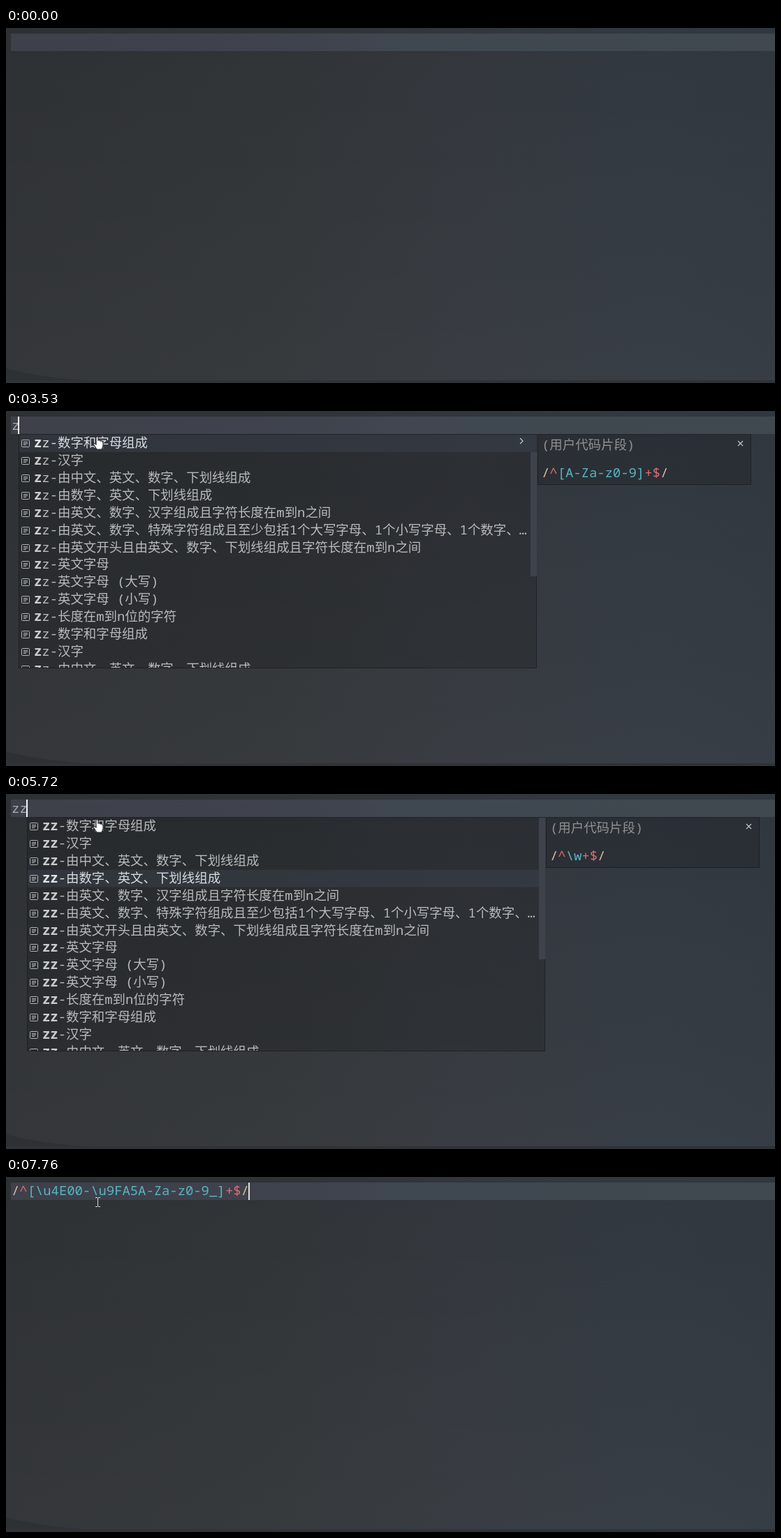
Animation, 1101 px wide and 509 px high, one loop 8000 ms. Source, as an HTML page with a canvas:

```html
<!DOCTYPE html>
<html lang="zh-CN">
<head>
<meta charset="utf-8">
<title>Snippet suggestions</title>
<style>
html, body { margin: 0; width: 100%; height: 100%; overflow: hidden; background: #32363a; }
canvas { display: block; }
</style>
</head>
<body>
<canvas id="stage" width="1101" height="509"></canvas>
<script>
const W = 1101, H = 509, LOOP = 8000, ROW = 24.92, CELL = 11.33;
const c = document.getElementById('stage').getContext('2d');

const MONO = '18.88px "Noto Sans Mono", "DejaVu Sans Mono", monospace';
const HAN = '18.43px "Noto Sans CJK SC", "Noto Sans CJK", sans-serif';
const SLASH = '#d9bd9f', RED = '#e06c75', CYAN = '#56b6c2', GOLD = '#d9b98a';

const labels = [
  '数字和字母组成', '汉字', '由中文、英文、数字、下划线组成', '由数字、英文、下划线组成',
  '由英文、数字、汉字组成且字符长度在m到n之间',
  '由英文、数字、特殊字符组成且至少包括1个大写字母、1个小写字母、1个数字、…',
  '由英文开头且由英文、数字、下划线组成且字符长度在m到n之间',
  '英文字母', '英文字母 (大写)', '英文字母 (小写)', '长度在m到n位的字符'
];
const regex = set => [['/', SLASH], ['^', RED], [set, CYAN], ['+$', RED], ['/', SLASH]];
const codes = [
  regex('[A-Za-z0-9]'),
  [['/', SLASH], ['^', RED], ['(?:', GOLD], ['[\\u3400-\\u4DB5\\u4E00-\\u9FEA]', CYAN]],
  regex('[\\u4E00-\\u9FA5A-Za-z0-9_]'),
  regex('\\w')
];
const thumbWidth = [0, 23, 261, 0];

// Timelines: [start in ms, value]
const selected = [[0, 0], [4740, 1], [5180, 2], [5720, 3], [6090, 2], [6620, 1], [7120, 2]];
const thumb = [[0, 0], [4980, .65], [5180, 0], [5500, 1], [5720, 0], [6410, 1], [7120, 0], [7360, 1]];
const caret = [[0, 0], [2560, 1], [4140, 0], [4630, 1], [5670, 0], [5720, 1],
  [6550, 0], [6620, 1], [7000, 0], [7120, 1]];
const at = (line, t) => line.findLast(k => k[0] <= t)[1];

// Pointer path: [ms, x, y, easing power into this point]
const path = [[260, 788, 467, 1], [1060, 176, 161, 1.5], [1160, 176, 161, 1], [1960, 116, 48, 1.5],
  [2030, 116, 48, 1], [2600, 122, 41, 1], [2770, 129, 38, 1], [2870, 130, 37, 1], [2890, 131, 36, 1]];

function pointerAt(t) {
  const i = path.findIndex(p => p[0] > t);
  if (i < 0) return path[path.length - 1].slice(1, 3);
  const a = path[i - 1], b = path[i];
  const k = 1 - Math.pow(1 - (t - a[0]) / (b[0] - a[0]), b[3]);
  return [1, 2].map(n => Math.round(a[n] + (b[n] - a[n]) * k));
}

function box(x, y, w, h, fill) {
  c.fillStyle = fill;
  c.fillRect(x, y, w, h);
}

function lines(color, width, ...strokes) {
  c.strokeStyle = color;
  c.lineWidth = width;
  c.beginPath();
  for (const s of strokes) s.forEach((p, i) => i ? c.lineTo(...p) : c.moveTo(...p));
  c.stroke();
}

function gradient(x, y, stops) {
  const g = c.createLinearGradient(0, 0, x, y);
  stops.forEach(([p, color]) => g.addColorStop(p, color));
  return g;
}

// Latin runs keep the cell width; Han runs use their own size.
function text(str, x, y, color, weight = 500) {
  c.fillStyle = color;
  for (const run of str.match(/[\u3000-\u9fff]+|[^\u3000-\u9fff]+/g)) {
    const han = run >= '\u3000';
    c.font = han ? '400 ' + HAN : weight + ' ' + MONO;
    c.fillText(run, x, y);
    x += han ? run.length * 18.43 : run.length * CELL;
  }
  return x;
}

function code(parts, x, y) {
  for (const [str, color] of parts) x = text(str, x, y, color);
}

function clipped(x, y, w, h, draw) {
  c.save();
  c.beginPath();
  c.rect(x, y, w, h);
  c.clip();
  draw();
  c.restore();
}

function background() {
  box(0, 0, W, H, gradient(W, 0, [[0, '#2e3134'], [.35, '#303437'], [.6, '#33373d'],
    [.85, '#31383f'], [1, '#31373e']]));
  box(0, 0, W, H, gradient(0, H, [[0, 'rgba(255,245,250,0)'], [1, 'rgba(255,245,250,.03)']]));
  c.fillStyle = '#2e3134';
  c.beginPath();
  c.moveTo(0, 488);
  c.quadraticCurveTo(45, 500, 110, 505);
  c.lineTo(0, 505);
  c.fill();
  box(0, 505, W, 4, '#303337');
  box(7, 8, W - 7, 25, gradient(W, 0, [[0, '#3e404a'], [.4, '#3f434d'], [.5, '#3f4750'], [1, '#404850']]));
}

function panel(x, w, h) {
  box(x, 34, w, h, 'rgba(0,0,0,.16)');
  c.strokeStyle = 'rgba(20,23,26,.55)';
  c.lineWidth = 1;
  c.strokeRect(x + .5, 33.5, w - 1, h);
}

function icon(x, y) {
  c.strokeStyle = '#b2b5b7';
  c.lineWidth = 1;
  c.beginPath();
  c.roundRect(x + .5, y + .5, 11, 10, 1);
  c.stroke();
  lines('#b2b5b7', 1, [[x + 3, y + 3.5], [x + 9, y + 3.5]],
    [[x + 3, y + 5.5], [x + 9, y + 5.5]], [[x + 3, y + 7.5], [x + 7, y + 7.5]]);
}

function list(t, x, typed, sel) {
  panel(x, 742, 335);
  clipped(x, 34, 742, 334, () => {
    if (t >= 3530) {
      const top = typed === 1 ? 59 : 34;
      box(x + 733, top, 9, 237 - top, '#3e434b');
    }
    box(x + 1, 34 + sel * ROW, sel ? 732 : 741, ROW, 'rgba(62,69,84,.42)');
    for (let i = 0; i < 14; i++) {
      const y = 34 + i * ROW, on = i === sel;
      icon(x + 4, Math.round(y + 7));
      const color = on ? '#d7dce0' : '#b8babb';
      const end = text('z'.repeat(typed), x + 22, y + 18, on ? '#e0e4e6' : '#c9cbca', 800);
      text('zz-'.slice(typed) + labels[i % labels.length], end, y + 18, color);
    }
    if (!sel && t >= 3210)
      lines('#c5c9cc', 1.2, [[x + 718, 39], [x + 722, 43], [x + 718, 47]]);
  });
}

function detail(t, x, sel) {
  panel(x, 306, 72);
  text('(用户代码片段)', x + 6, 55, '#8e9194');
  const cx = x + 290;
  lines('#c2c5c7', 1.2, [[cx - 3, 43], [cx + 4, 50]], [[cx + 4, 43], [cx - 3, 50]]);
  clipped(x, 34, 305, 72, () => {
    code(codes[sel], x + 6, 95);
    c.globalAlpha = at(thumb, t);
    box(x, 97, thumbWidth[sel], 9, '#434950');
    c.globalAlpha = 1;
  });
}

function ibeam(x, y) {
  const m = x + .5;
  lines('#d8dadb', 1, [[m, y - 6], [m, y + 6]],
    [[x - 3, y - 6.5], [x, y - 6.5]], [[x + 1, y - 6.5], [x + 4, y - 6.5]],
    [[x - 3, y + 6.5], [x, y + 6.5]], [[x + 1, y + 6.5], [x + 4, y + 6.5]]);
}

function hand() {
  const p = new Path2D('M129 38Q131 35 132 38V42Q134 41 135 43Q137 42 138 44Q139 44 139 46' +
    'V50L137 55H130L126 49Q124 46 126 46L129 48Z');
  c.fillStyle = '#fff';
  c.strokeStyle = '#25282b';
  c.lineWidth = 1.2;
  c.fill(p);
  c.stroke(p);
}

function draw(t) {
  const typed = t < 3030 ? 0 : t < 3680 ? 1 : 2;
  const done = t >= 7660;
  const sel = at(selected, t);
  background();
  if (done) code(codes[2], 8, 26);
  else if (typed) text('z'.repeat(typed), 8, 27, '#a5abb3');

  if (t >= 3080 && !done) {
    const x = typed === 1 ? 18 : 30;
    list(t, x, typed, sel);
    if (t >= 3170) detail(t, x + 743, sel);
  }
  if (at(caret, t)) {
    const x = done ? 347 : [7, 17, 29][typed];
    box(x, 8, 2, 25, done ? '#e6dfcf' : '#f4f5f5');
  }
  if (t >= 3130 && t < 7760) hand();
  else if (t >= 260) ibeam(...pointerAt(t));
}

function frame() {
  draw(performance.now() % LOOP);
  requestAnimationFrame(frame);
}
frame();
</script>
</body>
</html>
```
